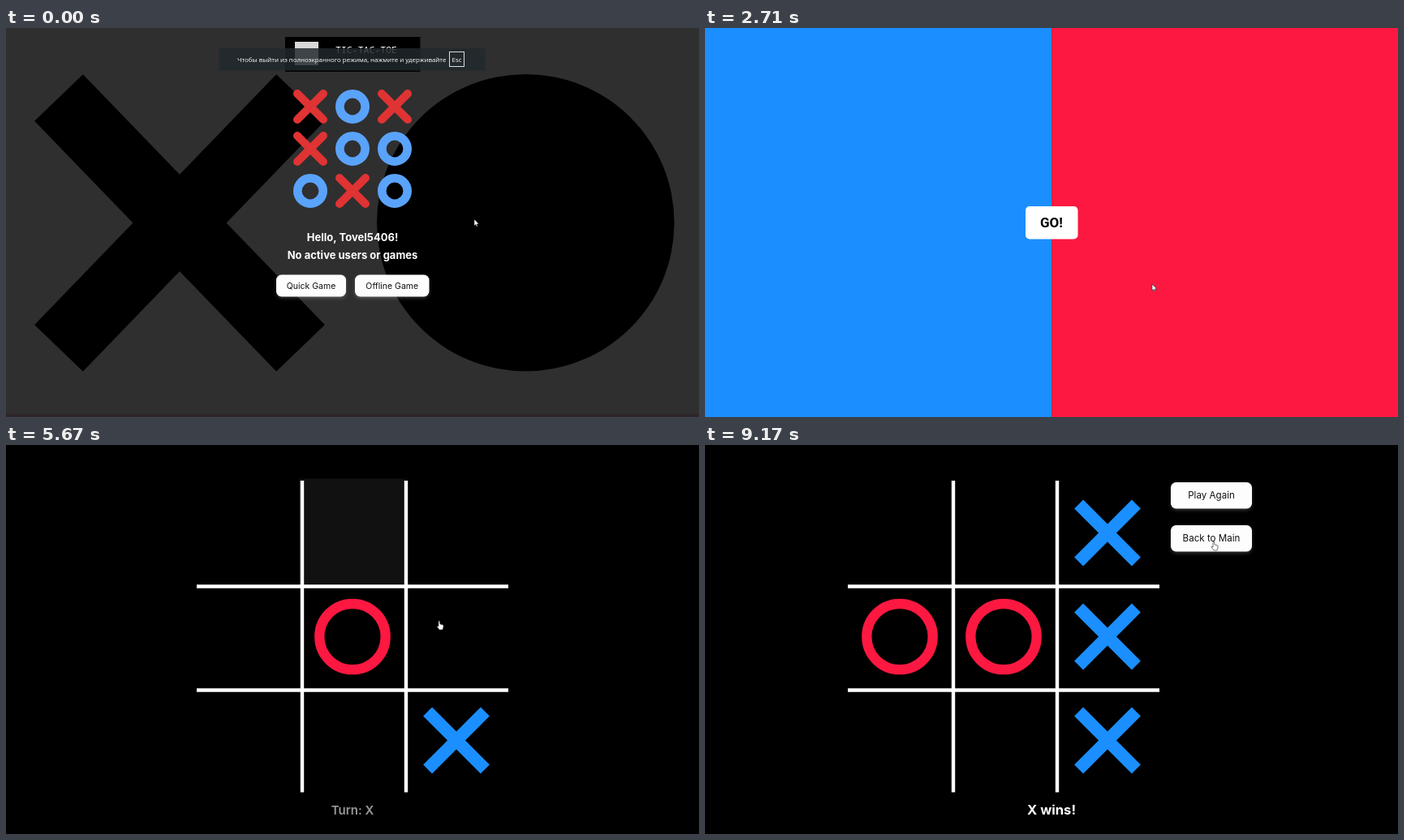
An HTML page with a canvas that plays this animation: 854 by 480 pixels, repeating every 9210 ms.

```html
<!DOCTYPE html>
<html lang="en">
<head>
<meta charset="utf-8">
<title>Noughts and crosses</title>
<style>
html, body { margin: 0; width: 100%; height: 100%; overflow: hidden; background: #000; }
canvas { display: block; }
</style>
</head>
<body>
<canvas id="stage" width="854" height="480"></canvas>
<script>
const ctx = document.getElementById('stage').getContext('2d');
const W = 854, H = 480, MID = W / 2, LOOP = 9210;
const BLUE = '#1b8fff', RED = '#fc1841';
const SANS = 'Inter, sans-serif';

const ramp = (t, start, end) => Math.max(0, Math.min(1, (t - start) / (end - start)));
const ease = p => p * p * (3 - 2 * p);
const smooth = (t, start, end) => ease(ramp(t, start, end));

function withAlpha(alpha, draw) {
  if (alpha <= 0) return;
  ctx.save();
  ctx.globalAlpha *= alpha;
  draw();
  ctx.restore();
}

function rect(x, y, w, h, color) {
  ctx.fillStyle = color;
  ctx.fillRect(x, y, w, h);
}

function rounded(x, y, w, h, r, color) {
  ctx.fillStyle = color;
  ctx.beginPath();
  ctx.roundRect(x, y, w, h, r);
  ctx.fill();
}

function line(x1, y1, x2, y2, width, color, cap = 'butt') {
  ctx.strokeStyle = color;
  ctx.lineWidth = width;
  ctx.lineCap = cap;
  ctx.beginPath();
  ctx.moveTo(x1, y1);
  ctx.lineTo(x2, y2);
  ctx.stroke();
}

// The two bars grow from the centre, `first` and `second` being their drawn parts.
function cross(x, y, dx, dy, width, color, cap, first = 1, second = 1) {
  const bar = (a, b) => line(x - a, y - b, x + a, y + b, width, color, cap);
  if (first) bar(dx * first, dy * first);
  if (second) bar(dx * second, -dy * second);
}

function ring(x, y, r, width, color, part = 1) {
  if (!part) return;
  ctx.strokeStyle = color;
  ctx.lineWidth = width;
  ctx.lineCap = 'butt';
  ctx.beginPath();
  ctx.arc(x, y, r, -Math.PI / 2, (2 * part - 0.5) * Math.PI);
  ctx.stroke();
}

function text(str, x, y, font, color, align = 'center') {
  ctx.font = font;
  ctx.fillStyle = color;
  ctx.textAlign = align;
  ctx.fillText(str, x, y);
}

function button(label, x, y, w, h, size) {
  ctx.save();
  ctx.shadowColor = 'rgba(255,255,255,.2)';
  ctx.shadowBlur = 4;
  ctx.shadowOffsetY = 2;
  rounded(x, y, w, h, 6.5, '#fdfdfd');
  ctx.restore();
  text(label, x + w / 2, y + h / 2 + size * 0.36, `${size}px ${SANS}`, '#111');
}

function drawMenu() {
  rect(0, 0, W, H, '#2f2f2f');
  cross(214, 240.5, 149, 154.5, 83, '#000');
  rounded(457, 57, 366.5, 366.5, 183.2, '#000');

  rect(344, 11, 166.5, 43, '#000');
  rect(356, 17, 29, 29, '#d8d8d8');
  text('TIC-TAC-TOE', 444, 31, '11.5px "Noto Sans Mono", monospace', '#fff');

  ['XOX', 'XOO', 'OXO'].forEach((row, j) => [...row].forEach((mark, i) => {
    const x = 375 + 52 * i, y = 97 + 52 * j;
    if (mark === 'O') ring(x, y, 15.7, 10.6, '#5aa3fb');
    else cross(x, y, 16, 16, 10, '#e03333', 'round');
  }));

  text('Hello, Tovel5406!', MID, 262.5, `700 13px ${SANS}`, '#fff');
  text('No active users or games', MID, 285, `700 13px ${SANS}`, '#fff');
  button('Quick Game', 333, 304.5, 86, 27, 10.5);
  button('Offline Game', 430, 304.5, 91.5, 27, 10.5);
}

function drawToast() {
  const font = '7.9px "Open Sans", "Noto Sans", sans-serif';
  rect(262.5, 25, 328, 27.5, 'rgba(33,41,45,.84)');
  text('Чтобы выйти из полноэкранного режима, нажмите и удерживайте', 285, 41.7, font, '#fff', 'left');
  text('Esc', 555.5, 41.7, font, '#fff');
  ctx.strokeStyle = '#ddd';
  ctx.lineWidth = 1;
  ctx.strokeRect(546.5, 29.5, 18, 18);
}

function drawCurtain(t) {
  const reach = 339.4 * smooth(t, 1300, 1800) + 87.6 * smooth(t, 1940, 2400);
  rect(0, 0, reach, H, BLUE);
  rect(W - reach, 0, reach, H, RED);
  withAlpha(smooth(t, 2400, 2650) * (1 - ramp(t, 3400, 3600)), () => {
    rounded(395, 220, 64.5, 40.5, 5, '#fff');
    text('GO!', MID, 246, '700 17px Roboto, sans-serif', '#000');
  });
  withAlpha(ramp(t, 3300, 3570), () => rect(0, 0, W, H, '#000'));
}

const cellX = col => 299 + 128 * col;
const cellY = row => 108.5 + 128 * row;

// X fills the right column; each O reply lands further left on the middle row.
const ROUNDS = [{ row: 2, at: 4500 }, { row: 0, at: 6020 }, { row: 1, at: 7300 }];
const WIN = ROUNDS[2].at;
const REPLY = 350, DRAW = 500;
const MARKS = ROUNDS.flatMap(({ row, at }, k) => [
  { kind: 'X', col: 2, row, start: at },
  { kind: 'O', col: 1 - k, row: 1, start: at + REPLY }
]).slice(0, 5);

function drawMark({ kind, col, row, start }, t) {
  const x = cellX(col), y = cellY(row), half = start + DRAW / 2, end = start + DRAW;
  if (kind === 'O') ring(x, y, 40.7, 12.3, RED, smooth(t, start, end));
  else cross(x, y, 35.4, 35.4, 15.5, BLUE, 'butt', smooth(t, start, half), smooth(t, half, end));
}

// After the win all marks dim, then the crosses light up in turn and the rings last.
function markAlpha({ kind, row }, t) {
  const lightUp = kind === 'X' ? 7850 + row * 200 : 8670;
  return 1 - 0.68 * (smooth(t, WIN, WIN + 200) - smooth(t, lightUp, lightUp + 300));
}

function drawHover(t) {
  if (t < ROUNDS[0].at + DRAW || t > WIN) return;
  const [x, y] = pointerAt(t - 180);
  const col = Math.round((x - cellX(0)) / 128), row = Math.round((y - cellY(0)) / 128);
  const taken = MARKS.some(m => m.col === col && m.row === row && t > m.start);
  if (!taken) rect(cellX(col) - 66, cellY(row) - 67, 131.5, 131, '#111');
}

function drawBoard(t) {
  const won = t >= WIN;
  ctx.save();
  if (won) ctx.translate(-59, 0);
  drawHover(t);
  for (const offset of [0, 128]) {
    line(365 + offset, 44, 365 + offset, 428.5, 4.4, '#fff');
    line(235, 174.5 + offset, 619, 174.5 + offset, 4.4, '#fff');
  }
  MARKS.forEach(mark => withAlpha(markAlpha(mark, t), () => drawMark(mark, t)));
  ctx.restore();

  if (won) {
    text('X wins!', MID, 456, `700 16.6px ${SANS}`, '#fff');
    button('Play Again', 574, 46, 100, 32.5, 11.6);
    button('Back to Main', 574, 99, 100, 32.5, 11.6);
  } else {
    const waiting = ROUNDS.some(({ at }) => t >= at && t < at + REPLY + DRAW / 2);
    text(`Turn: ${waiting ? 'O' : 'X'}`, MID, 455.5, `600 15px ${SANS}`, '#999');
  }
}

// The pointer rests at each stop and glides to the next just before its arrival time.
const GLIDE = 300;
const STOPS = [
  [0, 577, 236], [850, 487, 314], [1830, 498, 310], [2700, 551, 316],
  [4150, 297, 190], [4420, cellX(2), cellY(2)], [5300, cellX(1), 130],
  [5670, 534, 217], [5970, cellX(2), cellY(0)], [7050, cellX(2), cellY(1)],
  [7670, 602, 266], [8500, 653, 150], [9000, 627, 119]
];

function pointerAt(t) {
  return STOPS.reduce(([x, y], [at, nextX, nextY]) => {
    const p = smooth(t, at - GLIDE, at);
    return [x + (nextX - x) * p, y + (nextY - y) * p];
  }, STOPS[0].slice(1));
}

function drawPointer(t) {
  const hand = (t > 700 && t < 1050) || (t > 3900 && t < WIN) || t > 8900;
  const path = new Path2D(hand
    ? 'M-1 0H.5L1 4 5 5V8L4 11H0L-3 7-2 6-1 7Z'
    : 'M0 0V8L1.8 6.5 3 9 4.2 8.4 3.1 6 5.6 5.8Z');
  ctx.save();
  ctx.translate(...pointerAt(t));
  ctx.fillStyle = '#fff';
  ctx.fill(path);
  ctx.strokeStyle = '#222';
  ctx.lineWidth = 0.6;
  ctx.stroke(path);
  ctx.restore();
}

function draw(t) {
  rect(0, 0, W, H, '#000');
  withAlpha(1 - ramp(t, 970, 1190), drawMenu);
  withAlpha(1 - ramp(t, 1000, 1290), drawToast);
  rect(0, 476, W, 4, 'rgba(40,0,20,.2)');
  drawCurtain(t);
  withAlpha(ramp(t, 3570, 3800), () => drawBoard(t));
  drawPointer(t);
}

function frame() {
  draw(performance.now() % LOOP);
  requestAnimationFrame(frame);
}
frame();
</script>
</body>
</html>
```
